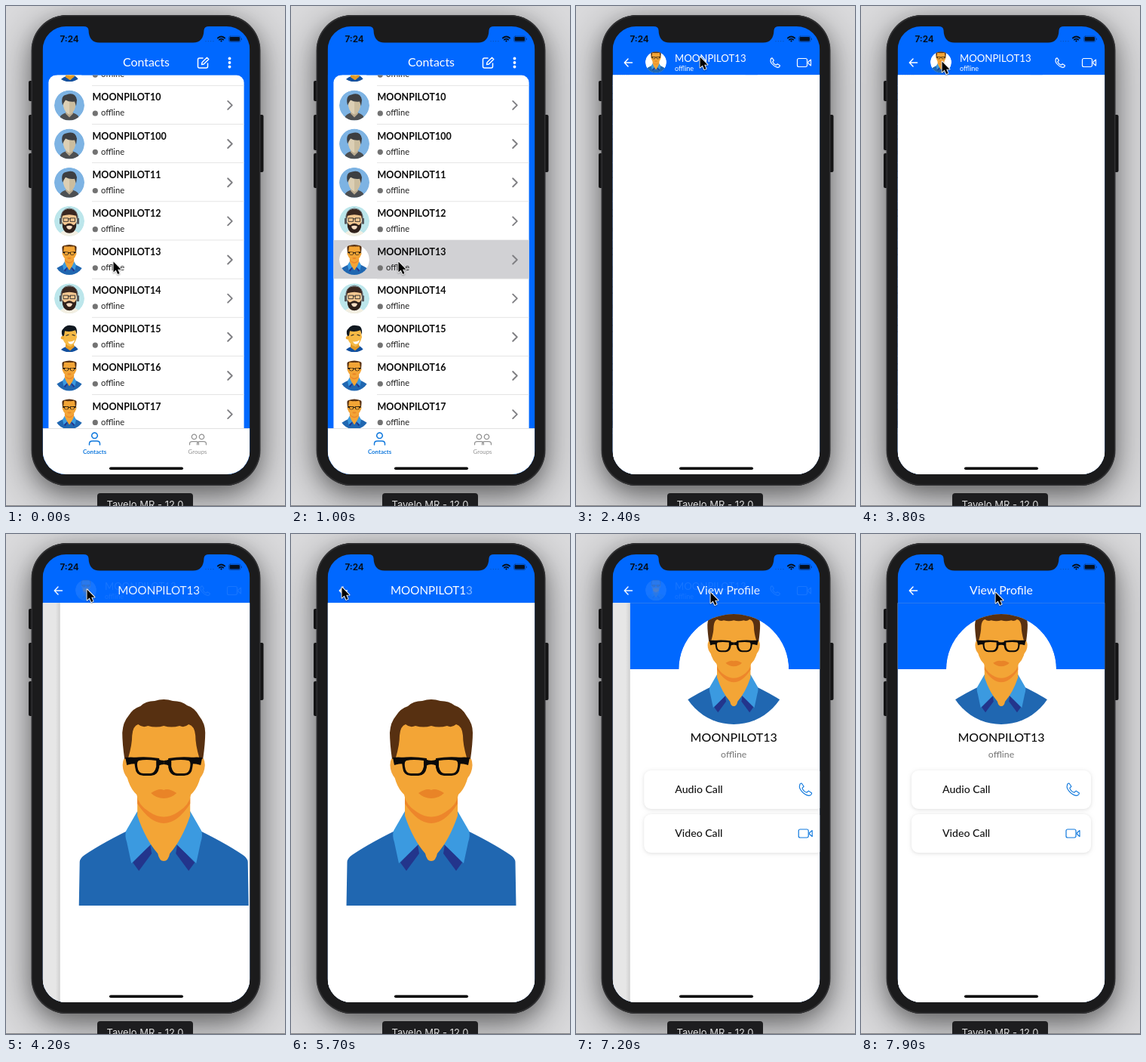
An HTML page with a canvas for the animation above (8 s loop, 370x662 px).

```html
<!DOCTYPE html>
<html lang="en">
<head>
<meta charset="utf-8">
<title>Contacts demo</title>
<style>
html, body { margin: 0; width: 100%; height: 100%; overflow: hidden; background: #d8d8da; }
canvas { display: block; width: 370px; height: 662px; }
</style>
</head>
<body>
<canvas id="stage"></canvas>
<script>
const W = 370, H = 662, LOOP = 8000, STEP = 100;
const SCREEN = { x: 48.6, y: 27, w: 274.8, h: 593 };
const BLUE = '#0068ff', LINK = '#0f78dd', DEVICE = '#1b1b1c';
const BAR = 91.2, CX = 186;
const LIST = 0, CHAT = 1, PHOTO = 2, PROFILE = 3;
const NAME = 'MOONPILOT';
const ROWS = [['9', 'd'], ['10', 'a'], ['100', 'a'], ['11', 'a'], ['12', 'b'],
  ['13', 'c'], ['14', 'b'], ['15', 'd'], ['16', 'c'], ['17', 'c']];

// start time, page left, page entered
const MOVES = [[1050, LIST, CHAT], [3950, CHAT, PHOTO], [5770, PHOTO, CHAT], [6950, CHAT, PROFILE]];
// time, x, y of the pointer tip
const POINTER = [[0, 142, 338], [1500, 142, 338], [1800, 153, 212], [1900, 158, 160], [2300, 164, 67],
  [2900, 164, 67], [3400, 107, 73], [4900, 107, 73], [5400, 67, 70], [6000, 67, 70], [6600, 178, 77]];

const canvas = document.getElementById('stage');
const dpr = window.devicePixelRatio || 1;
canvas.width = W * dpr;
canvas.height = H * dpr;
const c = canvas.getContext('2d');

function group(draw) { c.save(); draw(); c.restore(); }

function rr(x, y, w, h, r) { c.beginPath(); c.roundRect(x, y, w, h, r); }

function box(x, y, w, h, r, color) { rr(x, y, w, h, r); c.fillStyle = color; c.fill(); }

function fillPage(color, y = 90, h = 530) {
  c.fillStyle = color;
  c.fillRect(SCREEN.x, y, SCREEN.w, h);
}

function disc(x, y, r, color) {
  c.beginPath();
  c.arc(x, y, r, 0, 7);
  c.fillStyle = color;
  c.fill();
}

function shape(d, color) { c.fillStyle = color; c.fill(new Path2D(d)); }

function line(d, color, width) {
  c.strokeStyle = color;
  c.lineWidth = width;
  c.lineCap = c.lineJoin = 'round';
  c.stroke(new Path2D(d));
}

function text(s, x, y, size, color, align = 'left', weight = 400, family = 'Lato') {
  c.font = `${weight} ${size}px ${family}, "Open Sans", sans-serif`;
  c.textAlign = align;
  c.fillStyle = color;
  c.fillText(s, x, y);
}

function shadow(color, blur, dy) {
  c.shadowColor = color;
  c.shadowBlur = blur * dpr;
  c.shadowOffsetY = dy * dpr;
}

function at(x, y, s, draw) {
  group(() => { c.translate(x, y); c.scale(s, s); draw(); });
}

// ---- people ----

function mirrored(draw) {
  draw();
  group(() => { c.scale(-1, 1); draw(); });
}

// origin: the middle of the nose bridge
function man() {
  shape('M-112.500 185 L-111.500 127 Q-111 122 -105 118 Q-80 101 -36 80 L36 80 Q80 101 105 118 ' +
    'Q111 122 111.500 127 L112.500 185Z', '#2067b1');
  mirrored(() => {
    shape('M-41 128 L-18 104 L-16 116 L-33 139Z', '#23358c');
    shape('M-35 60 L-50 86 Q-52 92 -49 101 L-43 129 L-14 101Z', '#3b9ae0');
    shape('M-50 -12 Q-56 -8 -54 4 Q-52 14 -44 20Z', '#f2a43a');
  });
  shape('M-35 20 L-35 66 Q-24 98 -8 116 Q-6 126 0 126 Q6 126 8 116 Q24 98 35 66 L35 20Z', '#f3a536');
  shape('M-35 42 L35 42 L35 50 Q18 76 0 76 Q-18 76 -35 50Z', '#ed862b');
  shape('M-46 -60 L46 -60 L51 -4 Q50 25 36 38 Q34 52 19 61 Q0 74 -19 61 Q-34 52 -36 38 Q-50 25 -51 -4Z', '#f3a536');
  shape('M-52 -9 Q-55 -30 -55 -44 Q-54 -58 -47 -66 Q-41 -76 -31 -79 Q-24 -86 -12 -86 ' +
    'Q0 -90 12 -86 Q24 -86 31 -80 Q41 -77 47 -66 Q55 -56 55 -44 Q55 -30 52 -9 L47 -11 ' +
    'Q42 -28 42 -40 Q41 -53 33 -55 Q27 -50 21 -53 Q10 -50 0 -53 Q-10 -50 -21 -53 ' +
    'Q-28 -50 -34 -55 Q-41 -53 -42 -40 Q-42 -28 -47 -11Z', '#573011');
  shape('M-17 36 Q-6 29 0 32 Q6 29 17 36 Q10 43 0 43 Q-10 43 -17 36Z', '#e98427');
  mirrored(() => {
    const frame = '#0a0a0a';
    shape('M-51 -11 Q-44 -12 -36 -11 L-35 -3 Q-44 -3 -49 -1Z', frame);
    shape('M-8 -9 Q-4 -7 0 -7 L0 -2 Q-4 -2 -7 0Z', frame);
    shape('M-40 -11 Q-24 -13 -6 -10 L-6 2 Q-8 13 -17 13 H-27 Q-37 13 -38 2Z', frame);
    shape('M-33 -7 Q-24 -9 -10 -7 L-10 1 Q-12 10 -18 10 H-27 Q-34 10 -35 1 Q-36 -6 -33 -7Z', '#f3a536');
  });
}

// the figures below use a circle of radius 20
const FIGURES = {
  a() {
    disc(0, 0, 20, '#7db3e3');
    shape('M-14 20 Q-13 12 -5 10 L5 10 Q13 12 14 20Z', '#4c4f52');
    shape('M-4 7 L4 7 L5 11 L0 16 L-5 11Z', '#b9aa90');
    shape('M-8 -8 L8 -8 L8 1 Q6 10 0 12 Q-6 10 -8 1Z', '#dccfb4');
    shape('M0 -8 L8 -8 L8 1 Q6 10 0 12Z', '#cbbd9f');
    shape('M-9 0 Q-12 -13 -4 -14 Q8 -18 10 -7 L9 1 L7 -5 Q0 -4 -5 -7 L-7 -4Z', '#3d3f42');
  },
  b() {
    disc(0, 0, 20, '#bce6eb');
    shape('M-14 20 Q-13 14 -5 12 L5 12 Q13 14 14 20Z', '#f3efe2');
    shape('M-10 -10 L10 -10 L9 6 Q7 15 0 15 Q-7 15 -9 6Z', '#f4c791');
    shape('M-9.500 1 Q-7 6 -5 5 Q0 1 5 5 Q7 6 9.500 1 L9 8 Q7 16 0 16 Q-7 16 -9 8Z', '#30211b');
    shape('M-4 7 Q0 5 4 7 Q3 11 0 11 Q-3 11 -4 7Z', '#f7dcc2');
    shape('M-10.500 0 Q-13 -16 0 -16 Q13 -16 10.500 0 L9 -7 Q0 -10 -9 -7Z', '#3a2720');
    line('M-7.500 -4 h6 v4.500 h-6z M1.500 -4 h6 v4.500 h-6z M-1.500 -3 h3', '#2b2b2b', 0.9);
    line('M-11 0 Q-13 -16 0 -17 Q13 -16 11 0', '#686b70', 1);
    mirrored(() => box(-13, -4, 3, 8, 1, '#55595d'));
  },
  c() {
    disc(0, 0, 20, '#ffffff');
    at(0, -8.5, 0.174, man);
  },
  d() {
    disc(0, 0, 20, '#ffffff');
    shape('M-13 20 Q-12 16 -5 13 L7 12 Q12 15 13 20Z', '#12509f');
    shape('M-5 7 L5 7 L7 13 L1 18 L-5 14Z', '#e39a25');
    shape('M-9 -8 L8 -10 L10 0 Q8 9 2 13 Q-6 11 -9 2Z', '#f6b945');
    disc(-9, 1, 2.2, '#f0ab35');
    shape('M-9 -1 Q-12 -8 -8 -11 Q-4 -17 4 -15 Q11 -15 10 -3 L8 -9 Q1 -6 -6 -8 L-7 -2Z', '#101820');
    line('M-4 -2 L-1 -3 M4 -3 L7 -2', '#182028', 1.2);
    shape('M-2 6 Q3 7 7 4 Q6 9 2 9.500 Q-1 9 -2 6Z', '#ffffff');
  }
};

function avatar(kind, x, y, r) {
  group(() => {
    c.beginPath();
    c.arc(x, y, r, 0, 7);
    c.clip();
    at(x, y, r / 20, FIGURES[kind]);
  });
}

// ---- icons ----

const HANDSET = 'M3 6 C1 10 8 20 17 22 C20 22 22 20 22 18 L17 14.5 L14 17 C11 16 8 13 7 10 L9.500 7.500 L6 2.500 C4 2.500 3 4 3 6Z';

function phoneIcon(x, y, s, color) {
  at(x - 12 * s, y - 12 * s, s, () => line(HANDSET, color, 1.15 / s));
}

function videoIcon(x, y, color) {
  at(x, y, 1, () => {
    rr(-9, -5.5, 13, 11, 2);
    c.strokeStyle = color;
    c.lineWidth = 1.2;
    c.stroke();
    line('M5.500 -1 L9 -4 V4 L5.500 1Z', color, 1.1);
  });
}

function personIcon(x, y, s, color) {
  at(x, y, s, () => line('M0 -8 a3.800 3.800 0 1 1 -0.010 0 M-7 8 V6.500 Q-7 3 -3 3 H3 Q7 3 7 6.500 V8', color, 1.5));
}

// ---- pages ----

function listPage(t) {
  fillPage(BLUE);
  group(() => {
    rr(56.4, 91.5, 259.2, 520, [10, 10, 0, 0]);
    c.fillStyle = '#fff';
    c.fill();
    c.clip();
    ROWS.forEach(([id, kind], i) => {
      const y = 105.4 + 51.15 * (i - 1);
      if (id === '13' && t >= 1000 && t < 2000) {
        c.fillStyle = '#d1d1d4';
        c.fillRect(56, y, 260, 51);
      }
      avatar(kind, 84, y + 26, 20);
      text(NAME + id, 114.5, y + 20, 12.5, '#0b0b0b', 'left', 700);
      disc(118.3, y + 36.8, 3.6, '#737373');
      text('offline', 126, y + 40, 11.2, '#222');
      at(297, y + 26, 1, () => line('M-2.800 -5.500 L2.800 0 L-2.800 5.500', '#7f7f83', 1.9));
      c.fillStyle = '#dedede';
      c.fillRect(114, y + 50.7, 202, 0.8);
    });
  });
  fillPage('#fff', 559, 61);
  fillPage('#d5d5d5', 559, 0.7);
  personIcon(117.5, 573, 1, LINK);
  text('Contacts', 117.5, 593, 7.9, LINK, 'center', 700);
  personIcon(249.5, 574, 0.85, '#929292');
  personIcon(259.5, 574, 0.85, '#929292');
  text('Groups', 254, 593, 7.8, '#929292', 'center');
}

function blankPage() { fillPage('#fff'); }

function photoPage() {
  blankPage();
  at(CX, 307, 1, man);
}

function profilePage() {
  blankPage();
  fillPage(BLUE, 90, 89);
  fillPage('#005be2', 91.5, 0.7);
  avatar('c', CX, 179, 73);
  text(NAME + '13', CX, 275, 16, '#111', 'center', 500);
  text('offline', CX, 296, 12.3, '#747474', 'center');
  ['Audio Call', 'Video Call'].forEach((label, i) => {
    const y = 313 + 58 * i;
    group(() => {
      shadow('rgba(0,0,0,.13)', 5, 1);
      box(67, y, 238, 51, 9, '#fff');
    });
    text(label, 108, y + 29.5, 14.1, '#111', 'left', 500);
  });
  phoneIcon(281, 338, 0.84, LINK);
  videoIcon(281, 396.5, LINK);
}

const PAGES = [listPage, blankPage, photoPage, profilePage];

function header(page, alpha, shift, t) {
  group(() => {
    c.globalAlpha = alpha;
    const white = '#fff';
    if (page === LIST) {
      text('Contacts', CX + shift, 80, 15.9, white, 'center');
      line('M261 69 H256.500 Q254.500 69 254.500 71 V80 Q254.500 82 256.500 82 H265.500 Q267.500 82 267.500 80 V76', white, 1.5);
      line('M259.500 77.500 L260 74.800 L266.500 68.300 L268.800 70.500 L262.300 77Z', white, 1.4);
      for (const y of [69.5, 75, 80.5]) disc(296.5, y, 1.9, white);
      return;
    }
    line('M74.500 75 H64.500 M69 70 L64.300 75 L69 80', white, 1.5);
    if (page === CHAT) {
      avatar('c', 106, 74.5, 14);
      text(NAME + '13', 131 + shift, 74, 13.2, white);
      text('offline', 131 + shift, 86, 9, white);
      phoneIcon(264, 75, 0.64, white);
      videoIcon(302.5, 75, white);
    } else if (page === PHOTO) {
      const x = CX - 54 + shift;
      text(NAME + '1', x, 80, 15.2, white);
      const end = x + c.measureText(NAME + '1').width;
      if (t >= 4800 && t < 5800) c.globalAlpha = alpha * 0.5;
      text('3', end, 80, 15.2, white);
    } else {
      text('View Profile', CX + shift, 80, 15.8, white, 'center');
    }
  });
}

function drawPages(t) {
  const move = MOVES.filter(m => m[0] <= t).pop();
  let back = LIST, front = LIST, off = 0;
  if (move) {
    const [start, from, to] = move;
    const k = (t - start) * 0.0164;
    const rest = (1 + k) * Math.exp(-k);
    const pop = from > to;
    front = pop ? from : to;
    back = pop ? to : from;
    off = pop ? 1 - rest : rest;
  }
  const x = SCREEN.w * off;
  group(() => {
    c.beginPath();
    c.rect(SCREEN.x, BAR, SCREEN.w, 540);
    c.clip();
    if (front !== back) {
      fillPage('#fff');
      group(() => {
        c.translate(-0.3 * (SCREEN.w - x), 0);
        PAGES[back](t);
      });
      fillPage(`rgba(0,0,0,${0.108 * (1 - off)})`);
      const left = SCREEN.x + x;
      const edge = c.createLinearGradient(left - 6, 0, left, 0);
      edge.addColorStop(0, 'rgba(0,0,0,0)');
      edge.addColorStop(1, 'rgba(0,0,0,.1)');
      c.fillStyle = edge;
      c.fillRect(left - 6, 90, 6, 530);
    }
    c.translate(x, 0);
    PAGES[front](t);
  });
  if (front !== back && off > 0.004) header(back, off, 0, t);
  header(front, 1 - off, off * (front === CHAT ? 120 : 192), t);
}

// ---- device ----

function drawDevice() {
  c.fillStyle = '#dadadc';
  c.fillRect(0, 0, W, H);
  const body = () => box(34, 12, 303, 623, 47, DEVICE);
  group(() => { shadow('rgba(0,0,0,.48)', 52, 14); body(); });
  group(() => { shadow('rgba(0,0,0,.2)', 22, 8); body(); });
  c.fillStyle = '#858587';
  c.fillRect(0, 661, W, 1);
  for (const [x, y, h] of [[30, 99, 27], [30, 144, 47], [30, 195, 46], [334, 144, 76]]) {
    box(x, y, 7.5, h, 2, '#141415');
  }
  box(33.5, 12, 304, 623, 47, '#303032');
  box(35, 13.5, 301, 620, 46, DEVICE);
  box(121, 645, 127, 30, 4, '#1d1d1f');
  text('Tavelo MR - 12.0', 184.5, 665, 13, '#dedede', 'center', 400, 'Inter');
}

function drawStatus() {
  shape('M103 27 Q109 27 109.500 32 Q110 48.500 124 48.500 H248 Q262 48.500 262.500 32 Q263 27 269 27Z', DEVICE);
  const ink = '#06101f';
  text('7:24', 71.5, 48, 11.6, ink, 'left', 700, 'Inter');
  for (let i = 0; i < 4; i++) disc(265 + 3.3 * i, 46.6, 0.7, '#0a4fb4');
  line('M280.800 42.500 Q285.500 38.500 290.200 42.500 M282.800 44.700 Q285.500 42.500 288.200 44.700', ink, 1.7);
  disc(285.5, 46.4, 1.1, ink);
  rr(295.5, 40, 15.5, 7.5, 2);
  c.strokeStyle = '#0a3f94';
  c.lineWidth = 0.8;
  c.stroke();
  box(296.6, 41.1, 13.3, 5.3, 1.2, ink);
  box(311.8, 42.4, 1, 2.6, 0.5, '#0a3f94');
  box(137, 610.4, 98, 3.6, 1.8, '#000');
}

function drawPointer(t) {
  let i = POINTER.length - 1;
  while (POINTER[i][0] > t) i--;
  const [t0, x0, y0] = POINTER[i];
  const [t1, x1, y1] = POINTER[i + 1] || [LOOP, x0, y0];
  const k = (t - t0) / (t1 - t0);
  at(x0 + (x1 - x0) * k, y0 + (y1 - y0) * k, 1, () => {
    const arrow = 'M0.500 0.500 V14.500 L3.700 11.600 L6.200 17 L8.600 16 L6.200 10.700 H10.500Z';
    group(() => {
      shadow('rgba(0,0,0,.35)', 2, 1);
      line(arrow, '#fff', 1.8);
    });
    shape(arrow, '#000');
  });
}

function draw(t) {
  c.setTransform(dpr, 0, 0, dpr, 0, 0);
  drawDevice();
  group(() => {
    rr(SCREEN.x, SCREEN.y, SCREEN.w, SCREEN.h, 31);
    c.clip();
    c.fillStyle = BLUE;
    c.fillRect(SCREEN.x, SCREEN.y, SCREEN.w, SCREEN.h);
    drawPages(t);
    drawStatus();
  });
  drawPointer(t);
}

const begin = performance.now();
function tick() {
  const t = (performance.now() - begin) % LOOP;
  draw(Math.floor(t / STEP) * STEP);
  requestAnimationFrame(tick);
}
tick();
</script>
</body>
</html>
```
